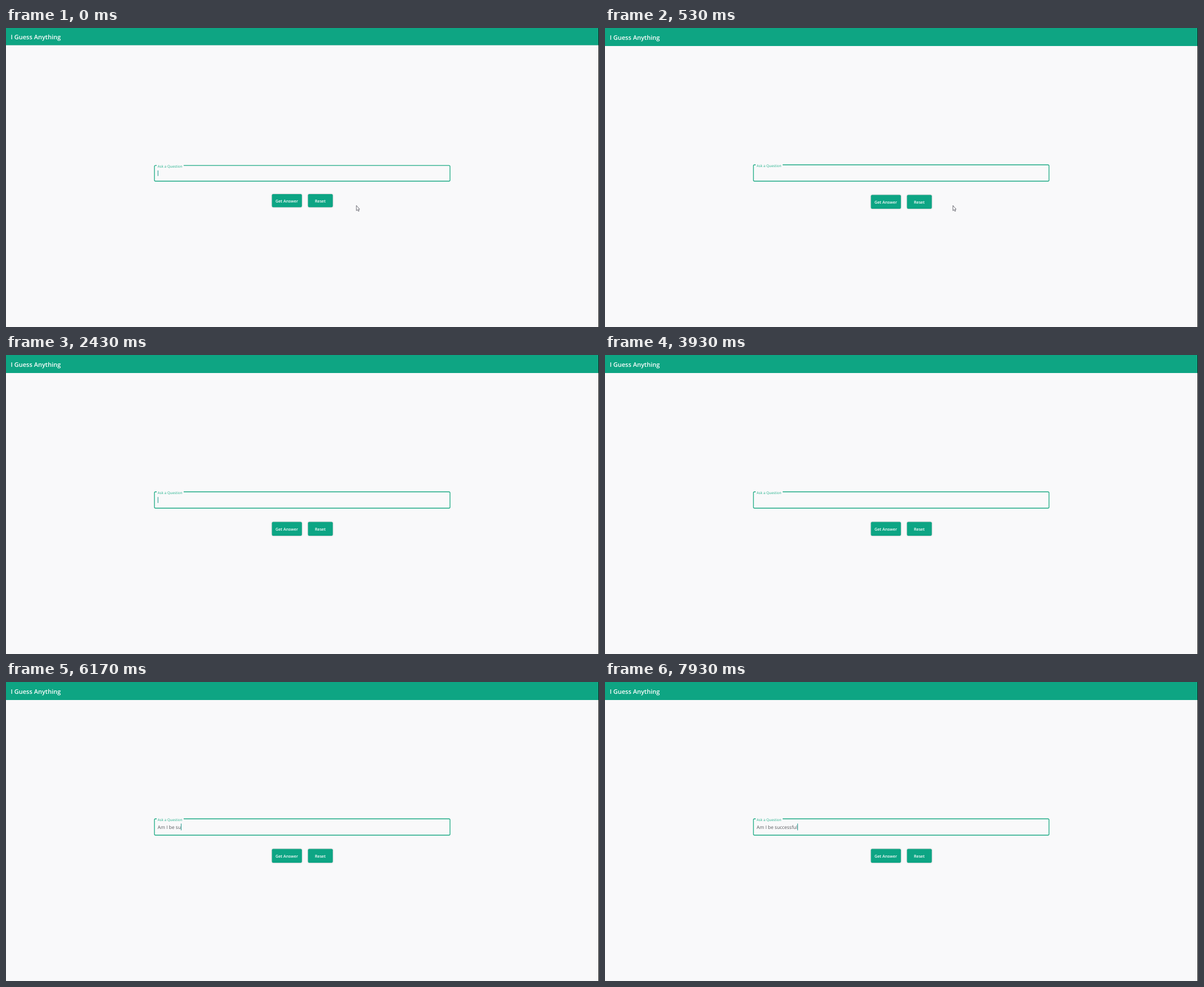
These frames come from a looping animation (1054 by 531 pixels, 8 s). An HTML page:

```html
<!DOCTYPE html>
<html lang="en">
<head>
<meta charset="utf-8">
<title>Ask a Question</title>
<style>
  html, body { margin: 0; width: 100%; height: 100%; overflow: hidden; background: #f9f9fa; }
  svg { display: block; width: 1054px; height: 531px; }
  text {
    font-family: "Open Sans", "Noto Sans", sans-serif;
    text-rendering: geometricPrecision;
    white-space: pre;
  }
  .title { font-size: 11px; font-weight: 600; fill: #fff; }
  .label { font-size: 6.3px; fill: #24b28c; }
  .typed { font-size: 8.45px; fill: #56585c; }
  .btn rect { fill: #0da584; filter: drop-shadow(0 .8px .8px rgba(0, 0, 0, .32)); }
  .btn text { font-size: 7.2px; font-weight: 600; fill: #fff; text-anchor: middle; }
  .bar { fill: #0ea583; filter: drop-shadow(0 .5px .6px rgba(0, 0, 0, .25)); }
</style>
</head>
<body>
<svg viewBox="0 0 1054 531">
  <rect width="1054" height="531" fill="#f9f9fa"/>
  <rect id="bar" class="bar" width="1054" height="32"/>
  <text id="title" class="title" x="8.6">I Guess Anything</text>

  <path id="field" fill="none" stroke="#1cab84" stroke-width="1.3"/>
  <text id="label" class="label" x="269.6">Ask a Question</text>
  <text id="typed" class="typed" x="269.6" y="261"></text>
  <rect id="caret" width="1.1" fill="#2a9d94"/>

  <g id="buttons">
    <g class="btn">
      <rect x="472.7" width="53.2" rx="2.2"/>
      <text x="499">Get Answer</text>
    </g>
    <g class="btn">
      <rect x="536.8" width="44" rx="2.2"/>
      <text x="558.5">Reset</text>
    </g>
  </g>

  <path id="pointer" d="M0 0V9.2L2 7.4L3.5 10.4L4.9 9.7L3.5 6.8H5.8Z"
        fill="#fff" stroke="#4b4b55" stroke-width=".8" stroke-linejoin="round"/>
  <rect x="1053" width="1" height="531" fill="#111"/>
</svg>

<script>
const LOOP = 8000;
const PHRASE = 'Am I be successful';
const TEXT_X = 269.6;

// Time at which each character of PHRASE appears
const KEYS = [4030, 4430, 4630, 5100, 5270, 5530, 5670, 5800, 6030,
              6170, 6570, 6700, 6870, 7030, 7200, 7470, 7700, 7930];

// Caret switches on and off before typing starts
const BLINKS = [170, 670, 1170, 1470, 1930, 2430, 2970, 3430, 3930, 4030];

// Pointer path: time, x, y
const PATH = [[0, 622.8, 315.2], [460, 622.8, 315.2], [530, 618.4, 315.2],
              [870, 375, 223], [970, 365, 221.5], [1470, 365, 221.5],
              [1670, 345.2, 225.2]];
const POINTER_END = 2100;

// Vertical layout before and after the page settles
const SETTLE = 70;
const EARLY = { bar: 30.5, title: 20.4, top: 244.2, label: 248.2, button: 295, height: 23.3, caption: 309.7 };
const LATE = { bar: 32, title: 21.4, top: 243, label: 247.2, button: 296.4, height: 24.6, caption: 311.7 };

const $ = id => document.getElementById(id);
const passed = (times, t) => times.filter(at => at <= t).length;

function place(layout) {
  const { bar, title, top, label, button, height, caption } = layout;
  $('bar').setAttribute('height', bar);
  $('title').setAttribute('y', title);
  $('label').setAttribute('y', label);
  $('field').setAttribute('d',
    `M267.8 ${top}H265.8q-2 0-2 2V270q0 2 2 2H787.2q2 0 2-2V${top + 2}q0-2-2-2H315.8`);
  for (const rect of $('buttons').querySelectorAll('rect')) {
    rect.setAttribute('y', button);
    rect.setAttribute('height', height);
  }
  for (const text of $('buttons').querySelectorAll('text')) text.setAttribute('y', caption);
}

function pointerAt(t) {
  const next = PATH.findIndex(p => p[0] > t);
  if (next < 0) return PATH[PATH.length - 1].slice(1);
  const [t0, x0, y0] = PATH[next - 1];
  const [t1, x1, y1] = PATH[next];
  const u = (t - t0) / (t1 - t0);
  const k = u * u * (3 - 2 * u);
  return [x0 + (x1 - x0) * k, y0 + (y1 - y0) * k];
}

function draw(t) {
  place(t < SETTLE ? EARLY : LATE);

  const typed = $('typed');
  const count = passed(KEYS, t);
  typed.textContent = PHRASE.slice(0, count);
  const width = count ? typed.getComputedTextLength() : 0;

  const caret = $('caret');
  caret.setAttribute('x', TEXT_X + width);
  caret.setAttribute('y', t < SETTLE ? 253 : count ? 251.4 : 252.2);
  caret.setAttribute('height', t < SETTLE ? 9.8 : count ? 12 : 10.6);
  caret.style.display = passed(BLINKS, t) % 2 ? 'none' : '';

  const pointer = $('pointer');
  pointer.style.display = t < POINTER_END ? '' : 'none';
  pointer.setAttribute('transform', `translate(${pointerAt(t)})`);
}

let start = null;
function tick(now) {
  start ??= now;
  draw((now - start) % LOOP);
  requestAnimationFrame(tick);
}
draw(0);
requestAnimationFrame(tick);
</script>
</body>
</html>
```
